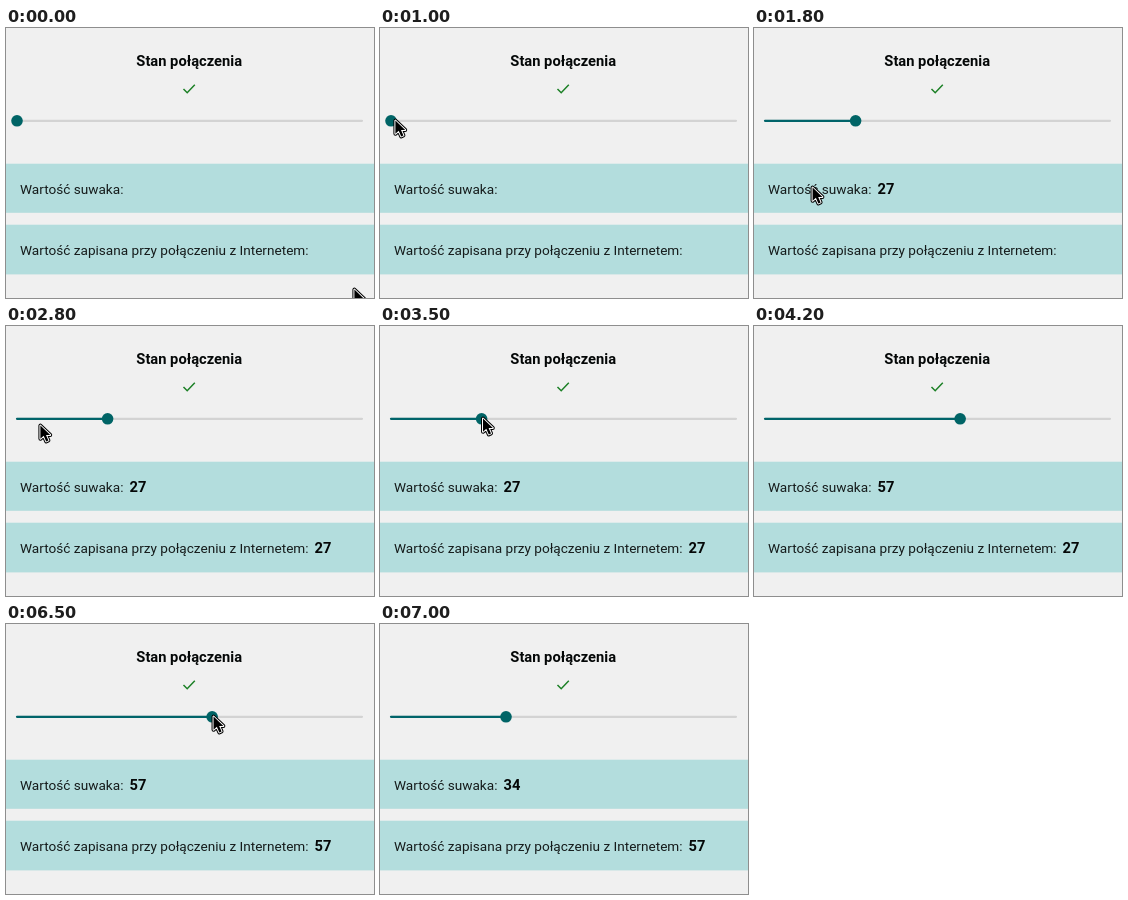
An HTML page for the animation above (7200 ms loop, 368 by 270 pixels).

```html
<!DOCTYPE html>
<html lang="pl">
<head>
<meta charset="utf-8">
<title>Stan połączenia</title>
<style>
  html, body { margin: 0; width: 100%; height: 100%; overflow: hidden; background: #f0f0f0; }
  svg { display: block; width: 368px; height: 270px; }
  text { font: 13.6px Roboto, sans-serif; fill: #151b1b; }
  .bold { font-size: 14.7px; font-weight: 700; fill: #050808; }
</style>
</head>
<body>
<svg viewBox="0 0 368 270">
  <defs>
    <path id="arrow" d="M1.4 2.6V15.8L4.7 12.8 7.2 18.4 9.4 17.4 7 12H11.2Z" stroke-linejoin="round"/>
  </defs>
  <rect width="368" height="270" fill="#f0f0f0"/>
  <text class="bold" x="183.2" y="38" text-anchor="middle">Stan połączenia</text>
  <path d="M177.5 61 181.2 64.7 188.8 56.8" fill="none" stroke="#1c8026" stroke-width="1.5"/>

  <path d="M11 92.8H356" stroke="#d3d3d3" stroke-width="2.2" stroke-linecap="round"/>
  <path id="fill" stroke="#00646a" stroke-width="2.2" stroke-linecap="round"/>
  <circle id="halo" cy="92.8" r="15" fill="#006466" opacity=".2"/>
  <circle id="knob" cy="92.8" r="5.8" fill="#006466"/>

  <rect y="135.7" width="368" height="49.1" fill="#b3dddd"/>
  <rect y="196.7" width="368" height="49.7" fill="#b3dddd"/>
  <text x="14" y="166">Wartość suwaka:</text>
  <text id="value" class="bold" x="123.6" y="166"></text>
  <text x="14" y="227">Wartość zapisana przy połączeniu z Internetem:</text>
  <text id="saved" class="bold" x="308.6" y="227"></text>

  <g id="cursor">
    <use href="#arrow" stroke="#000" stroke-width="4"/>
    <use href="#arrow" stroke="#fff" stroke-width="2"/>
    <use href="#arrow"/>
  </g>
</svg>
<script>
const LOOP = 7200, STEP = 100, TOUCH_Y = 90;
const $ = id => document.getElementById(id);
const knobX = v => 11 + (v - 1) * 345 / 99;
const mix = (a, b, k) => a + (b - a) * k;
const ease = k => (1 - Math.cos(Math.PI * k)) / 2;
const progress = (t, { start, end }) => Math.min(1, (t - start) / (end - start));

const drags = [
  { start: 1000, end: 1300, from: 1, to: 27 },
  { start: 3500, end: 3800, from: 27, to: 57 },
  { start: 6500, end: 6700, from: 57, to: 34 }
];

// pointer glides along Bézier curves; it hides after those marked "leave"
const grip = v => [knobX(v), TOUCH_Y];
const glides = [
  { start: 0, end: 900, curve: [[347, 259], [200, 100], [-60, -47], [14, TOUCH_Y]] },
  { start: 1300, end: 1600, curve: [grip(27), [103, 140], [90, 187]] },
  { start: 1600, end: 2400, curve: [[90, 187], [12, 122], [33, 97]] },
  { start: 2900, end: 3500, curve: [[33, 97], [60, 20], grip(27)] },
  { start: 3800, end: 4100, curve: [grip(57), [73, 235]], leave: true },
  { start: 5900, end: 6500, curve: [[80, 221], [150, 48], grip(57)] },
  { start: 6700, end: 6900, curve: [grip(34), [146, 227]], leave: true }
];

function bezier(points, k) {
  if (points.length === 1) return points[0];
  const next = points.slice(1).map((p, i) => p.map((c, axis) => mix(points[i][axis], c, k)));
  return bezier(next, k);
}

function slider(t) {
  const drag = drags.findLast(d => t > d.start);
  if (!drag) return { v: 1, pressed: false };
  return { v: mix(drag.from, drag.to, ease(progress(t, drag))), pressed: t <= drag.end };
}

function pointer(t) {
  const glide = glides.findLast(g => t >= g.start);
  return glide.leave && t > glide.end ? null : bezier(glide.curve, progress(t, glide));
}

function draw(time) {
  const t = Math.floor(time % LOOP / STEP) * STEP;
  const { v, pressed } = slider(t);
  const x = knobX(v);
  $('fill').setAttribute('d', `M11 92.8H${x}`);
  $('knob').setAttribute('cx', x);
  $('halo').setAttribute('cx', x);
  $('halo').style.display = pressed ? '' : 'none';
  $('value').textContent = t > drags[0].start ? Math.round(v) : '';
  $('saved').textContent = t < 2800 ? '' : t < 5800 ? 27 : 57;

  const p = pressed ? grip(v) : pointer(t);
  $('cursor').style.display = p ? '' : 'none';
  if (p) $('cursor').setAttribute('transform', `translate(${p})`);
}

const origin = performance.now();
function tick() {
  draw(performance.now() - origin);
  requestAnimationFrame(tick);
}
tick();
</script>
</body>
</html>
```
